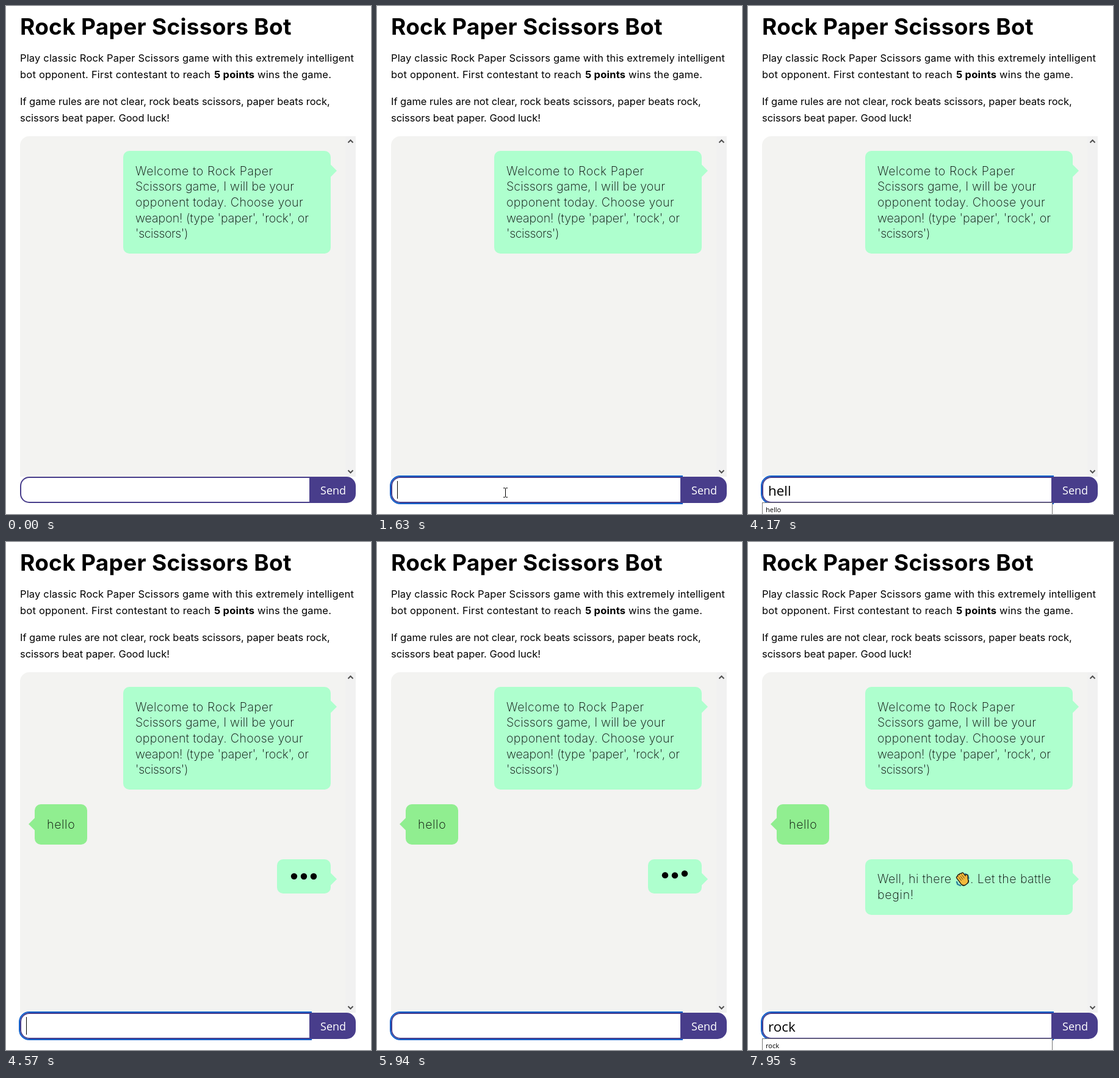
Write an HTML page with a canvas that moves like this. It is 598 px wide and 831 px high and loops after 8 s.

```html
<!DOCTYPE html>
<html lang="en">
<head>
<meta charset="utf-8">
<title>Rock Paper Scissors Bot</title>
<style>
  html, body { margin: 0; width: 100%; height: 100%; overflow: hidden; background: #fff; }
  canvas { display: block; }
</style>
</head>
<body>
<canvas id="stage" width="598" height="831"></canvas>
<script>
const ctx = document.getElementById('stage').getContext('2d');
const LOOP = 8000;
const PURPLE = '#483d8b', MINT = '#aeffce', GREEN = '#90ee90';
const BODY = '400 16.5px Inter, sans-serif';
const BOLD = '700 16.5px Inter, sans-serif';
const CHAT = '200 19.6px Inter, sans-serif';
const FIELD = '400 22.4px "Open Sans", sans-serif';

// [start, value] lists; the last entry already reached wins
const TYPED = [[0, ''], [3550, 'h'], [3820, 'he'], [3890, 'hel'], [4090, 'hell'], [4220, 'hello'],
  [4570, ''], [7400, 'r'], [7470, 'ro'], [7680, 'roc'], [7750, 'rock']];
const HINT = [[0, ''], [3620, 'hello'], [4570, ''], [7470, 'rock']];
const CARET_FLIPS = [1480, 2020, 2550, 3080, 3550, 4090, 4220, 4740, 5270, 5805, 6340, 6870, 7400, 7950];
const FOCUS = 1480, SENT = 4570, REPLY = 6140;

const at = (list, t) => list.filter(e => e[0] <= t).pop()[1];

function text(str, x, y, font, spacing = 0, color = '#000') {
  ctx.font = font;
  ctx.letterSpacing = spacing + 'px';
  ctx.fillStyle = color;
  ctx.fillText(str, x, y);
}

function shape(color, points) {
  ctx.fillStyle = color;
  ctx.beginPath();
  points.forEach(([x, y]) => ctx.lineTo(x, y));
  ctx.closePath();
  ctx.fill();
}

function box(x, y, w, h, radii, color) {
  ctx.fillStyle = color;
  ctx.beginPath();
  ctx.roundRect(x, y, w, h, radii);
  ctx.fill();
}

function line(points, color, width) {
  ctx.strokeStyle = color;
  ctx.lineWidth = width;
  ctx.beginPath();
  points.forEach(([x, y]) => ctx.lineTo(x, y));
  ctx.stroke();
}

function bubble(x, y, w, h, color, side) {
  box(x, y, w, h, 10, color);
  const edge = side > 0 ? x + w : x, mid = y + 32.5;
  shape(color, [[edge - side, mid - 11], [edge + side * 10, mid], [edge - side, mid + 11]]);
}

function drawIntro() {
  text('Rock Paper Scissors Bot', 23, 47, '700 37px Inter, sans-serif', 0.29);
  text('Play classic Rock Paper Scissors game with this extremely intelligent', 23, 91, BODY, 0.17);
  text('bot opponent. First contestant to reach', 23, 118, BODY, 0.21);
  text('5 points', 341, 118, BOLD, 0.21);
  text('wins the game.', 412, 118, BODY, 0.21);
  text('If game rules are not clear, rock beats scissors, paper beats rock,', 23, 162, BODY, -0.03);
  text('scissors beat paper. Good luck!', 23, 189, BODY, -0.03);
}

function drawPanel() {
  box(23, 213, 550, 557, [15, 0, 0, 0], '#f3f3f1');
  box(556, 213, 17, 557, 0, '#f1f1f1');
  line([[560.5, 223.5], [564.5, 219.5], [568.5, 223.5]], '#505050', 2);
  line([[560.5, 759.5], [564.5, 763.5], [568.5, 759.5]], '#505050', 2);
}

function drawWelcome() {
  bubble(192, 237, 340, 168, MINT, 1);
  text('Welcome to Rock Paper', 212, 277, CHAT, 0.6);
  text('Scissors game, I will be your', 212, 302, CHAT, 0.15);
  text('opponent today. Choose your', 212, 328, CHAT, 0.34);
  text("weapon! (type 'paper', 'rock', or", 212, 354, CHAT);
  text("'scissors')", 212, 379, CHAT, -0.4);
}

function drawDots(t) {
  bubble(444, 519, 88, 56, MINT, 1);
  ctx.fillStyle = '#000';
  for (let i = 0; i < 3; i++) {
    const age = Math.max(0, t - SENT + 25 - i * 300);
    const lift = 2.5 * (1 - Math.cos(age / 500 * Math.PI * 2));
    ctx.beginPath();
    ctx.arc(472 + i * 16, 547 - lift, 5.2, 0, Math.PI * 2);
    ctx.fill();
  }
}

function drawWave() {
  ctx.save();
  ctx.translate(352, 552);
  ctx.lineCap = 'round';
  ctx.lineJoin = 'round';
  line([[4, -9], [8, -7], [9.5, -2]], '#2c7f9b', 2.4);
  line([[-10, 4], [-8.5, 8], [-4, 10]], '#2c7f9b', 2.4);
  ctx.rotate(-0.65);
  // Fingers and palm: dark silhouette first, then the fill
  for (const [color, grow] of [['#1d1a12', 1.3], ['#f3b93b', 0]]) {
    for (let i = 0; i < 4; i++) {
      const tip = -9 + Math.abs(i - 1.4);
      line([[-4.6 + i * 3.1, tip], [-4.6 + i * 3.1, 2]], color, 3 + grow * 2);
    }
    line([[8.2, -1], [4, 5]], color, 3 + grow * 2);
    box(-6.2 - grow, -2 - grow, 12.4 + grow * 2, 11 + grow * 2, 5, color);
  }
  for (let i = 0; i < 3; i++) line([[-3 + i * 3.1, -6], [-3 + i * 3.1, 0]], '#5a4213', 0.8);
  ctx.restore();
}

function drawReply() {
  bubble(192, 519, 340, 91, MINT, 1);
  text('Well, hi there', 212, 558, CHAT, 0.42);
  drawWave();
  text('. Let the battle', 364, 558, CHAT, 0.43);
  text('begin!', 212, 584, CHAT, 0.7);
}

function drawField(t) {
  box(23, 770, 476, 43, [15, 0, 0, 15], PURPLE);
  box(25, 772, 472, 39, [13, 0, 0, 13], '#fff');
  if (t >= FOCUS) {
    ctx.strokeStyle = '#1060cc';
    ctx.lineWidth = 2;
    ctx.beginPath();
    ctx.roundRect(22, 769, 478, 45, [16, 0, 0, 16]);
    ctx.stroke();
  }
  // The button hides the right side of the focus ring
  box(497, 770, 76, 43, [0, 15, 15, 0], PURPLE);
  text('Send', 515, 799, '500 18px "Open Sans", sans-serif', 0, '#fff');
  const typed = at(TYPED, t);
  text(typed, 33, 801, FIELD);
  if (CARET_FLIPS.filter(f => f <= t).length % 2) {
    box(Math.floor(33 + ctx.measureText(typed).width), 777, 1, 29, 0, '#000');
  }
  const hint = at(HINT, t);
  if (hint) {
    box(23, 812, 476, 30, 0, '#767676');
    box(24, 813, 474, 30, 0, '#fff');
    text(hint, 29, 828, '400 11px "Open Sans", sans-serif');
  }
}

function pointerAt(t) {
  if (t < 310 || t >= 2020) return null;
  if (t < 1150) {
    const p = Math.floor((t - 310) / 70) / 11;
    const e = 1 - (1 - p) ** 2;
    return [556 - 345.5 * e, 718 + 75 * e];
  }
  if (t < 1810) return [210.5, 796];
  const p = (Math.floor((t - 1810) / 70) + 1) / 3;
  const e = p ** 1.5;
  return [210.5 + 191 * e, 796 - 50 * e];
}

function drawPointer(t) {
  const pos = pointerAt(t);
  if (!pos) return;
  const [x, y] = pos.map(Math.floor);
  if (y >= 770 && x < 498) {
    ctx.fillStyle = '#000';
    ctx.fillRect(x, y - 7, 1, 14);
    for (const end of [y - 8, y + 7]) {
      ctx.fillRect(x - 3, end, 3, 1);
      ctx.fillRect(x + 1, end, 3, 1);
    }
    return;
  }
  const arrow = [[0, 0], [0, 17], [4, 13], [6.5, 19], [9, 18], [6.5, 12], [12, 12]]
    .map(([a, b]) => [x + a + 0.5, y + b + 0.5]);
  shape('#fff', arrow);
  line([...arrow, arrow[0]], '#000', 1);
}

function frame(now) {
  const t = now % LOOP;
  ctx.fillStyle = '#fff';
  ctx.fillRect(0, 0, 598, 831);
  drawIntro();
  drawPanel();
  drawWelcome();
  if (t >= SENT) {
    bubble(47, 429, 86, 66, GREEN, -1);
    text('hello', 67, 469, CHAT, 0.65);
    if (t < REPLY) drawDots(t);
    else drawReply();
  }
  drawField(t);
  drawPointer(t);
}

const start = performance.now();
function tick() {
  frame(performance.now() - start);
  requestAnimationFrame(tick);
}
tick();
</script>
</body>
</html>
```
